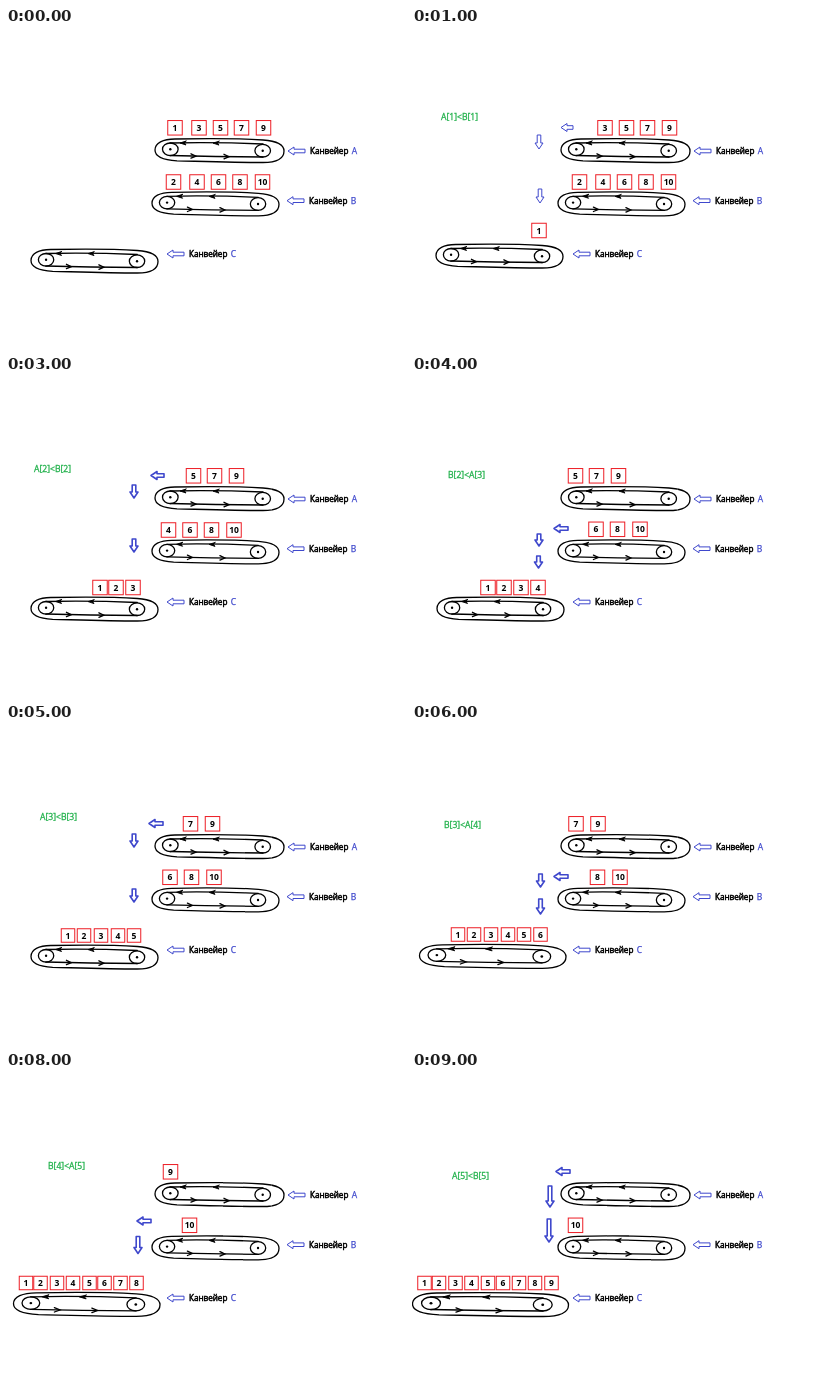
Animation, 400 px wide and 320 px high, one loop 10000 ms. Source, as an HTML page:

```html
<!DOCTYPE html>
<html lang="ru">
<head>
<meta charset="utf-8">
<title>Слияние конвейеров</title>
<style>
  html, body { margin: 0; width: 100%; height: 100%; overflow: hidden; background: #fff; }
  svg { display: block; width: 400px; height: 320px; }
  text { font-family: "Open Sans", "Noto Sans", sans-serif; font-size: 8.5px; }
  .belt { fill: none; stroke: #000; stroke-width: 1.3; stroke-linecap: round; }
  .belt * { vector-effect: non-scaling-stroke; }
  .belt .dot { fill: #000; stroke: none; }
  .belt .tip { fill: #000; stroke-width: 0.9; }
  .box rect { fill: #fff; stroke: #ed1c24; stroke-width: 1; }
  .box text { font-weight: 700; text-anchor: middle; }
  .arrow { fill: #fff; stroke: #3f48cc; stroke-linejoin: round; }
  .label { font-size: 8.1px; stroke: #000; stroke-width: 0.5; }
  .letter { fill: #3f48cc; stroke: #3f48cc; stroke-width: 0.25; }
  .rule { font-size: 8.6px; fill: #22b14c; stroke: #22b14c; stroke-width: 0.3; }
  .step { visibility: hidden; animation: show 10s step-end infinite; }
  @keyframes show {
    0% { visibility: visible; }
    10%, 100% { visibility: hidden; }
  }
</style>
</head>
<body>
<svg id="stage" viewBox="0 0 400 320"></svg>
<script>
const BELT_WIDTH = 129;
const SLOTS_A = [169, 193, 214.5, 235.5, 257.5];
const SLOTS_B = [167.5, 191, 212.5, 234, 256.5];
const WIDE = [0, 16, 33, 50, 66, 82.5];
const TIGHT = [0, 14.5, 31, 47, 63.5, 78.5, 94.5, 110.5, 127];

// a, b: first remaining item and shift of the row; c: first x, y and gaps
// left, down: arrow tips as [x, y, length]; belt: x, y, width
const steps = [
  { a: [0, 0], b: [0, 0], belt: [25, 220.5, 127] },
  { rule: ["A[1]<B[1]", 29, 92], a: [1, 0], b: [0, 0], c: [127, 202.5, WIDE],
    left: [149, 99.5, 12], down: [[127, 121, 14], [128, 175, 14]], belt: [24, 215.5, 127] },
  { rule: ["B[1]<A[2]", 33, 100], a: [1, -27], b: [1, 0], c: [105.5, 211.5, [0, 25]],
    left: [146, 153.5, 13], down: [[130, 176, 12], [130, 201, 12]] },
  { rule: ["A[2]<B[2]", 28, 96], a: [2, -27], b: [1, -28.5], c: [94, 211.5, WIDE],
    left: [145, 99.5, 13], down: [[128, 122, 13], [128, 176, 13]] },
  { rule: ["B[2]<A[3]", 36, 102], a: [2, -51], b: [2, -28.5], c: [76, 211.5, WIDE],
    left: [142, 152.5, 14], down: [[127, 170, 12], [126.5, 192, 12]] },
  { rule: ["A[3]<B[3]", 34, 96], a: [3, -51], b: [2, -48.5], c: [62, 211.5, WIDE],
    left: [143, 99.5, 14], down: [[128, 123, 13], [128, 178, 13]] },
  { rule: ["B[3]<A[4]", 32, 104], a: [3, -71.5], b: [3, -48.5], c: [46, 210.5, WIDE],
    left: [142, 152.5, 14], down: [[128.5, 163, 13], [128.5, 190, 15]], belt: [7.5, 219.8, 146.5] },
  { rule: ["A[4]<B[4]", 40, 97], a: [4, -71.5], b: [3, -73], c: [33.5, 211, TIGHT],
    left: [144, 99.5, 14], down: [[132, 125, 15], [132, 180, 15]], belt: [7.5, 219.8, 146.5] },
  { rule: ["B[4]<A[5]", 42, 97], a: [4, -93], b: [4, -73], c: [20, 211, TIGHT],
    left: [131, 149, 14], down: [[132, 181.5, 17]], belt: [7.5, 219.8, 146.5] },
  { rule: ["A[5]<B[5]", 40, 106.5], a: [5, 0], b: [4, -93], c: [12.5, 211, TIGHT],
    left: [144, 99.5, 14], down: [[138, 135, 21], [137, 170, 23]], belt: [0.5, 220, 156] }
];

const belt = (x, y, width) => `
  <g class="belt" transform="translate(${x} ${y}) scale(${width / BELT_WIDTH} 1)">
    <path d="M0 12C0 5 8 1 20 1C55 .3 85 .5 108 2C122 3 129 7 129 13C129 20 122 24.5 108 24.5C80 24.5 50 23.5 22 22.8C8 22 0 19 0 12Z"/>
    <path d="M15 5Q60 4 108 6M15 17.5Q60 18.5 108 19"/>
    <path d="M36 15.8L41 18.2L36 20.2M69 16.3L74 18.7L69 20.8"/>
    <path class="tip" d="M31 3L25 5L31 7L29.5 5ZM64 3.2L58 5.1L64 7.1L62.5 5.1Z"/>
    <ellipse cx="15.3" cy="11.3" rx="7.8" ry="6.3"/>
    <ellipse cx="107.7" cy="12.7" rx="7.8" ry="6.3"/>
    <circle class="dot" cx="15.3" cy="11.3" r="1.2"/>
    <circle class="dot" cx="107.7" cy="12.7" r="1.2"/>
  </g>`;

const arrow = ([x, y, length], angle = 0, weight = 1) =>
  `<path class="arrow" stroke-width="${weight}" transform="translate(${x} ${y}) rotate(${angle})"
    d="M0 0L6 -4V-1.8H${length}V1.8H6V4Z"/>`;

const box = (number, x, y, size = 14.5) => `
  <g class="box" transform="translate(${x} ${y})">
    <rect x="${-size / 2}" y="${-size / 2}" width="${size}" height="${size}"/>
    <text y="3.1">${number}</text>
  </g>`;

const row = (slots, [first, shift], y, parity) => slots
  .map((x, i) => i < first ? "" : box(2 * i + parity, x + shift, y)).join("");

const sorted = (count, [x, y, gaps]) => gaps.slice(0, count)
  .map((gap, i) => box(i + 1, x + gap, y, count > 4 ? 13.5 : 14.5)).join("");

const label = (letter, x, y) => `
  ${arrow([x - 22, y, 17])}
  <text class="label" x="${x}" y="${y + 3}">Канвейер</text>
  <text class="letter" x="${x + 41.7}" y="${y + 3}">${letter}</text>`;

const drawStep = (s, i) => {
  const weight = i === 1 ? 1 : 1.6;
  return `
  <g class="step" style="animation-delay:${i - steps.length}s">
    ${belt(...(s.belt || steps[0].belt))}
    ${row(SLOTS_A, s.a, 99.8, 1)}
    ${row(SLOTS_B, s.b, i < 4 ? 154 : 153.3, 2)}
    ${s.c ? sorted(i, s.c) : ""}
    ${s.left ? arrow(s.left, 0, weight) : ""}
    ${(s.down || []).map(tip => arrow(tip, -90, weight)).join("")}
    ${s.rule ? `<text class="rule" x="${s.rule[1]}" y="${s.rule[2]}">${s.rule[0].replace("<", "&lt;")}</text>` : ""}
  </g>`;
};

document.getElementById("stage").innerHTML =
  belt(149, 110, 129) + belt(146, 163.3, 127) +
  label("A", 304, 123) + label("B", 303, 172.7) + label("C", 183, 226) +
  steps.map(drawStep).join("");
</script>
</body>
</html>
```
